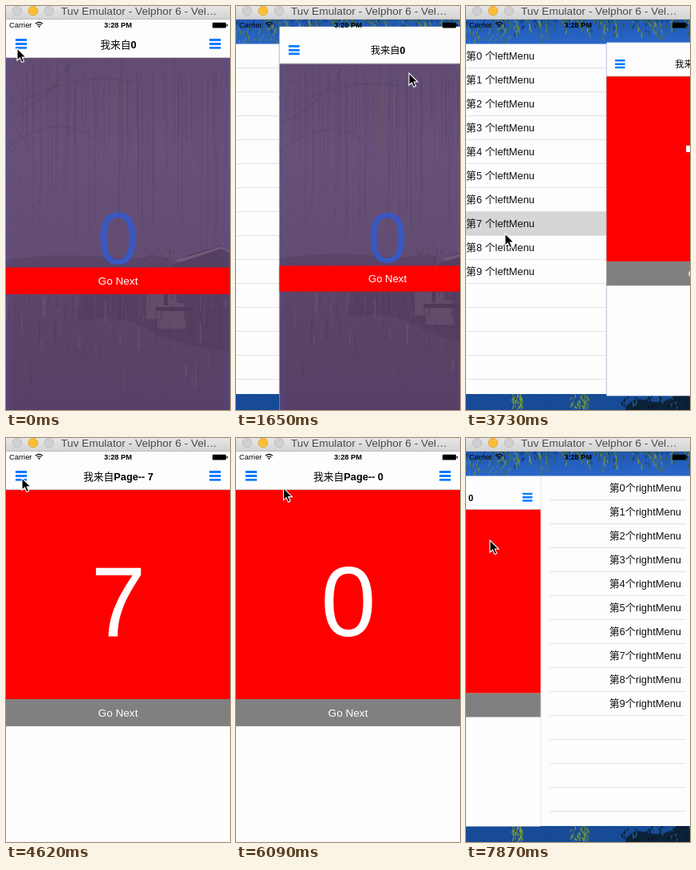
An HTML page that plays this animation: 281 by 506 pixels, repeating every 8000 ms.

```html
<!DOCTYPE html>
<html lang="zh-CN">
<head>
<meta charset="utf-8">
<title>Side menu demo</title>
<style>
html, body { margin: 0; width: 100%; height: 100%; overflow: hidden; background: #fff; }
svg { display: block; width: 100%; height: 100%; }
text { font-family: "Liberation Sans", "Noto Sans CJK SC", "Noto Sans CJK", sans-serif; white-space: pre; }
.mid { text-anchor: middle; }
.end { text-anchor: end; }
.bold { font-weight: bold; }
.cjk { font-weight: 500; }
.row { font-size: 12.9px; fill: #111; }
.sep { stroke: #e2e2e4; stroke-width: 1; }
</style>
</head>
<body>
<svg id="stage" viewBox="0 0 281 506">
  <defs>
    <linearGradient id="sky" x2="0" y2="1">
      <stop offset="0" stop-color="#1f57b4"/><stop offset=".06" stop-color="#2a66c8"/><stop offset="1" stop-color="#164a96"/>
    </linearGradient>
    <linearGradient id="dusk" x2="0" y2="1">
      <stop offset="0" stop-color="#624c72"/><stop offset=".25" stop-color="#685178"/>
      <stop offset=".55" stop-color="#634c72"/><stop offset=".68" stop-color="#5c4467"/><stop offset="1" stop-color="#573f66"/>
    </linearGradient>
    <linearGradient id="edge">
      <stop offset="0" stop-color="#5450a0" stop-opacity=".3"/><stop offset=".04" stop-color="#5450a0" stop-opacity="0"/>
      <stop offset=".96" stop-color="#5450a0" stop-opacity="0"/><stop offset="1" stop-color="#5450a0" stop-opacity=".3"/>
    </linearGradient>
    <linearGradient id="chrome" x2="0" y2="1">
      <stop offset="0" stop-color="#e6e6e6"/><stop offset="1" stop-color="#d3d3d3"/>
    </linearGradient>
    <clipPath id="photoBox"><path d="M0 65H281V517H0Z"/></clipPath>
  </defs>
  <g id="wallpaper"></g>
  <g id="left"></g>
  <g id="right"></g>
  <g id="panel">
    <rect y="17" width="281" height="500" fill="#fdfdfd"/>
    <g id="photoPage">
      <g id="photo" clip-path="url(#photoBox)"></g>
      <text class="mid" x="140.5" y="323" font-size="92.5" fill="#3958c0">0</text>
      <rect y="327.5" width="281" height="33.5" fill="#f00"/>
    </g>
    <g id="redPage">
      <rect y="65" width="281" height="262" fill="#f00"/>
      <rect y="327" width="281" height="34" fill="#808080"/>
      <text id="digit" class="mid" x="141" y="248" font-size="124" fill="#fff"></text>
    </g>
    <path d="M0 64.7H281" stroke="#a8a4ac" stroke-width=".6"/>
    <text class="mid" x="140.5" y="349" font-size="13.6" fill="#fff">Go Next</text>
    <text class="mid bold" x="141" y="52.5" font-size="12.75"><tspan class="cjk">我来自</tspan><tspan id="title"></tspan></text>
    <path id="icons" stroke="#0a7cff" stroke-width="2.8"/>
    <path d="M-.5 17V517M281.5 17V517" stroke="#000" stroke-opacity=".12"/>
  </g>
  <g id="status">
    <text x="4" y="27.3" font-size="9.3">Carrier</text>
    <path d="M37 22.2Q41.5 18.6 46 22.2M38.7 24.1Q41.5 21.9 44.3 24.1" fill="none" stroke="#000" stroke-width="1.2"/>
    <path d="M40 25.2Q41.5 24.2 43 25.2L41.5 27Z"/>
    <text class="mid bold" x="140.5" y="27.3" font-size="9.3">3:28 PM</text>
    <rect x="259" y="20.8" width="17" height="6.6" rx="1"/><rect x="276.6" y="22.8" width="1.4" height="2.6"/>
  </g>
  <rect width="281" height="17" fill="url(#chrome)"/>
  <path d="M0 16.5H281" stroke="#bdbdbd"/>
  <g stroke-width=".8">
    <circle cx="14" cy="6" r="5.8" fill="#d0d0d0" stroke="#bcbcbc"/>
    <circle cx="34" cy="6" r="5.8" fill="#fdbe35" stroke="#dfa023"/>
    <circle cx="54" cy="6" r="5.8" fill="#d0d0d0" stroke="#bcbcbc"/>
  </g>
  <text x="69" y="11" font-size="13.7" fill="#4a4a4a">Tuv Emulator - Velphor 6 - Vel…</text>
  <path id="cursor" d="M0 0V15.2L3.5 12L6 17.6L8.6 16.4L6.2 11H11Z" fill="#000" stroke="#fff" stroke-width="1.1"/>
</svg>
<script>
const $ = id => document.getElementById(id);
const LOOP = 8000, OPEN = 187.5, SHRINK = 0.122, MID = 267, SLIDE = 2.02;

function rng(seed) {
  return () => (seed = (seed * 16807) % 2147483647) / 2147483647;
}
const times = (n, f) => Array.from({ length: n }, (_, i) => f(i)).join("");
const line = (d, color, width, extra = "") =>
  `<path d="${d}" fill="none" stroke="${color}" stroke-width="${width}" ${extra}/>`;

function drawWallpaper() {
  const r = rng(71);
  const leaf = (x, y, color, w = 1) =>
    line(`M${x} ${y}l${r() * 5 - 2.5} ${2 + r() * 4}`, color, w);
  let out = `<rect y="17" width="281" height="489" fill="url(#sky)"/>`;
  out += times(150, () => leaf(r() * 281, 15 + r() * r() * 22, r() < .5 ? "#15407c" : "#2c5c50", 1.5));
  // hanging twigs along the top
  out += times(18, i => {
    const x = 30 + i * 14 + r() * 8, lean = r() * 30 - 6, fall = 12 + r() * 18;
    return line(`M${x} 17q${lean * .7} 3 ${lean} ${fall}`, "#3f6448", .8) +
      times(9, k => leaf(x + lean * Math.sqrt(k / 9), 16 + fall * k / 9, r() < .6 ? "#50784a" : "#7f9a50"));
  });
  out += times(50, () => leaf(r() * 58, 24 + r() * 20, r() < .5 ? "#3d6e58" : "#5f8a50"));
  // water and reeds along the bottom
  out += `<path d="M200 506Q206 488 226 494T262 488T281 492V506Z" fill="#0a1c2c" opacity=".85"/>`;
  out += times(50, () => leaf(195 + r() * 86, 485 + r() * 18, r() < .7 ? "#0b1a26" : "#2b5a78", 1.4));
  [[59, 12], [132, 22]].forEach(([x, w]) => {
    out += times(42, () => leaf(x + r() * w, 485 + r() * 18, r() < .5 ? "#4f7f40" : "#84a040", 1.1));
  });
  $("wallpaper").innerHTML = out;
}

function drawPhoto() {
  const r = rng(2024);
  const speck = (x, y, color) =>
    line(`M${x} ${y}l${r() * 4 - 2} ${1 + r() * 4}`, color, 1.2, 'opacity=".4"');
  let out = `<rect y="65" width="281" height="452" fill="url(#dusk)"/>`;
  // foliage on the left, then branches and strands
  out += times(260, () => speck(r() * r() * 80, 65 + r() * 250, r() < .6 ? "#755567" : "#584264"));
  out += line("M0 142Q50 125 85 65M0 180Q60 130 110 165M20 120Q90 80 160 95", "#523f5f", 1.1, 'opacity=".5"');
  out += times(90, () => {
    const x = 20 + r() * 265, len = 50 + r() * 180, bend = r() * 12 - 6;
    return line(`M${x} ${65 + r() * 35}c${bend} ${len / 3} ${-bend / 2} ${len * .7} ${bend / 2} ${len}`,
      r() < .75 ? "#533f62" : "#785668", .6 + r() * .6, `opacity="${.25 + r() * .35}"`);
  });
  out += times(110, () => speck(172 + r() * 45, 327 - r() * r() * 38, r() < .6 ? "#503b5a" : "#785866"));
  out += `<path d="M0 318Q60 309 118 314T180 312L205 316V328H0Z" fill="#533e61" opacity=".5"/>
    <path d="M205 327L228 312L270 300L281 308V328H205Z" fill="#513c5c" opacity=".8"/>
    <path d="M212 319L270 301L281 307V309L270 304L218 321Z" fill="#6f5a78"/>
    <path d="M90 361H281V432Q220 428 180 406T90 395Z" fill="#50395a" opacity=".5"/>
    <path d="M176 361H214V372H226V404H190V392H176Z" fill="#6d5774" opacity=".55"/>
    <path d="M188 377H233V382H188ZM198 361V375H203V361Z" fill="#4f395a"/>`;
  out += times(130, () => line(`M${r() * 281} ${358 + r() * r() * 110}v${5 + r() * 26}`,
    r() < .45 ? "#715872" : "#4d3858", .8 + r() * 1.8, `opacity="${.15 + r() * .35}"`));
  out += times(20, () => line(`M${r() * 250} ${410 + r() * 95}h${8 + r() * 30}`,
    r() < .5 ? "#66506f" : "#50395c", 1, 'opacity=".3"'));
  out += `<rect y="65" width="281" height="452" fill="url(#edge)"/>`;
  $("photo").innerHTML = out;
}

const rowY = i => 47.5 + 30 * i;
const seps = (x1, x2) => times(14, i => `<path class="sep" d="M${x1} ${rowY(i + 1)}H${x2}"/>`);
const rows = (x, cls, label) =>
  times(10, i => `<text class="row ${cls}" x="${x}" y="${rowY(i) + 19.5}">${label(i)}</text>`);

function drawMenus() {
  $("left").innerHTML = `<rect y="47.5" width="187.5" height="438.5" fill="#fdfdfd"/>
    <rect id="chosen" width="187.5" height="29.5" fill="#d6d6d6"/>
    <g id="lines">${seps(11, OPEN)}</g>${seps(185, OPEN)}
    <path id="firstLine" class="sep"/>
    ${rows(11.2, "", i => `第${i} 个leftMenu`)}`;
  $("right").innerHTML = `<rect x="93" y="47.5" width="190" height="438.5" fill="#fdfdfd"/>
    ${seps(105, 276)}${rows(270, "end", i => `第${i}个rightMenu`)}`;
}

const bars = x => [42.5, 47.5, 52.3].map(y => `M${x} ${y}h14.2`).join("");
const ease = x => {
  x = Math.min(1, Math.max(0, x));
  return x * x * (3 - 2 * x);
};

// start tick, opening or closing, side
const slides = [
  [1.29, 1, 1], [9.7, 0, 1], [17.02, 1, 1], [24.7, 0, 1],
  [32.29, 1, 1], [38.7, 0, 1], [46.29, 1, -1]
];
// start tick, end tick, x, y
const moves = [
  [2.5, 7, 217, 84], [11.2, 15, 22, 53], [20, 23, 49, 285], [26.5, 31, 20, 50],
  [34.5, 37, 44, 64], [40.2, 45, 254, 45], [51, 53, 30, 128]
];

// the screen refreshes in ticks of about 150 ms
const tickAt = ms => ms < 1946 ? Math.floor(ms / 150) : 13 + Math.floor((ms - 1946) / 148);

function slideAt(n) {
  let open = 0, side = 1, closing = false;
  for (const [start, to, s] of slides) {
    if (n < start) break;
    const k = ease((n - start) / SLIDE);
    open = to ? k : 1 - k;
    side = s;
    closing = !to;
  }
  return { open, side, closing };
}

function cursorAt(n) {
  let x = 14, y = 53;
  for (const [a, b, tx, ty] of moves) {
    const k = ease((n - a) / (b - a));
    x += (tx - x) * k;
    y += (ty - y) * k;
  }
  return [x, y];
}

const show = (id, on) => $(id).setAttribute("display", on ? "inline" : "none");

function render(ms) {
  const n = tickAt(ms);
  const { open, side, closing } = slideAt(n);
  const red = n >= 25, page = n >= 39 || !red ? 0 : 7;
  const scale = 1 - SHRINK * open;
  const x = side > 0 ? OPEN * open : 281 - OPEN * open - 281 * scale;
  $("panel").setAttribute("transform", `translate(${x} ${MID * (1 - scale)}) scale(${scale})`);
  $("left").setAttribute("transform", `translate(${-OPEN * (1 - open)} 0)`);
  $("right").setAttribute("transform", `translate(${OPEN * (1 - open)} 0)`);
  show("left", side > 0 && open > 0);
  show("right", side < 0 && open > 0);
  show("lines", closing);
  show("firstLine", open === 1);
  $("firstLine").setAttribute("d", `M${red ? 12 : 20} 77.5H${red ? 57 : OPEN}`);
  show("chosen", red);
  $("chosen").setAttribute("y", rowY(page) + .5);
  show("photoPage", !red);
  show("redPage", red);
  $("digit").textContent = page;
  $("title").textContent = red ? `Page-- ${page}` : "0";
  $("cursor").setAttribute("transform", `translate(${cursorAt(n)})`);
}

drawWallpaper();
drawPhoto();
drawMenus();
$("icons").setAttribute("d", bars(12) + bars(255.2));

const began = performance.now();
function loop() {
  render((performance.now() - began) % LOOP);
  requestAnimationFrame(loop);
}
loop();
</script>
</body>
</html>
```
